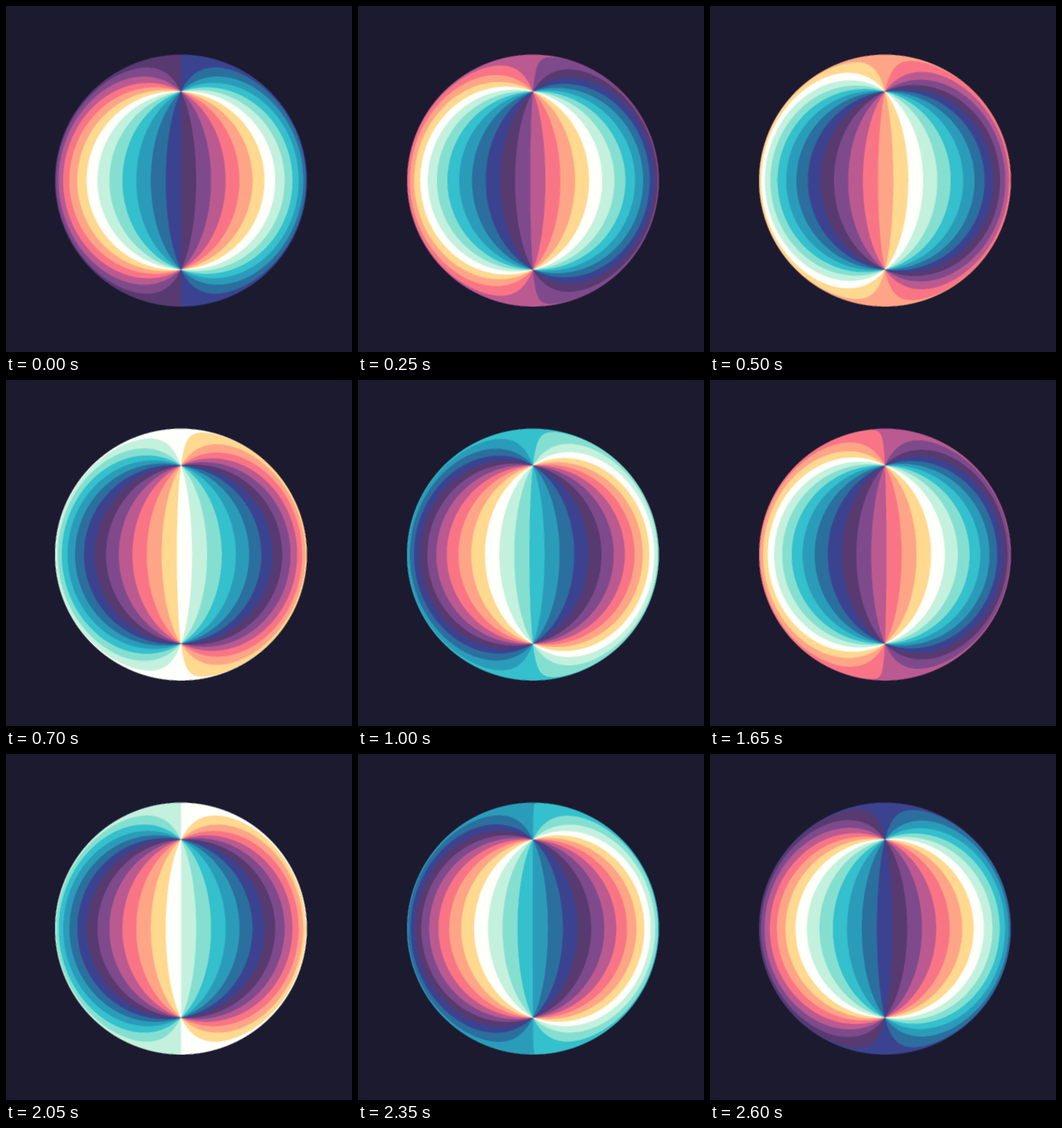
Write an HTML page with a canvas that moves like this. It is 498 px wide and 498 px high and loops after 2.65 s.

```html
<!DOCTYPE html>
<html lang="en">
<head>
<meta charset="utf-8">
<title>Banded sphere</title>
<style>
  html, body { margin: 0; width: 100%; height: 100%; overflow: hidden; background: #1c1a2f; }
  canvas { display: block; width: 498px; height: 498px; }
</style>
</head>
<body>
<canvas id="stage" width="498" height="498"></canvas>
<script>
const SIZE = 498, CX = 251.8, CY = 251.3, R = 181.3;
const LOOP = 2650, STEP = 50, TAPS = 9, SPREAD = 0.75;
const BG = [28, 26, 47];
const BANDS = [
  '573a70', '7e4a8c', 'bb5a90', 'f97585', 'ffa587', 'ffd98f', 'fffffb',
  'c3f1de', '85dfd0', '34c0cc', '2a9cba', '2a6f9e', '3b4390'
].map(hex => [0, 2, 4].map(i => parseInt(hex.substr(i, 2), 16)));
const N = BANDS.length;

// Rotation in bands after a number of steps; the speed drifts slightly.
const TURN = [[0, 0], [5, 2.18], [14, 6.27], [26, 12.2], [33, 15.9], [41, 20], [52, 25.53], [53, 26]];

const ctx = document.getElementById('stage').getContext('2d');
const left = Math.floor(CX - R) - 2, top0 = Math.floor(CY - R) - 2;
const side = Math.ceil(2 * R) + 5;
const image = ctx.createImageData(side, side);
const pixels = image.data;
const lon = new Float32Array(side * side * TAPS);

// Longitude, in bands, of a whole sphere in equal-area azimuthal projection.
function longitude(px, py) {
  const x = (px - CX) / R, y = (py - CY) / R, rr = x * x + y * y;
  if (rr >= 1) return -1;
  const angle = Math.atan2(2 * x * Math.sqrt(1 - rr), 1 - 2 * rr);
  return Math.min((angle / Math.PI + 1) * N, 2 * N - 1e-4);
}

function prepare() {
  let i = 0;
  for (let y = 0; y < side; y++)
    for (let x = 0; x < side; x++)
      for (let t = 0; t < TAPS; t++) {
        const dx = (t % 3 - 1) * SPREAD, dy = (Math.floor(t / 3) - 1) * SPREAD;
        lon[i++] = longitude(left + x + 0.5 + dx, top0 + y + 0.5 + dy);
      }
}

function turnAt(step) {
  let i = 1;
  while (TURN[i][0] < step) i++;
  const [a, from] = TURN[i - 1], [b, to] = TURN[i];
  return from + (to - from) * (step - a) / (b - a);
}

function draw(step) {
  const shift = turnAt(step) % N;
  for (let p = 0, i = 0; p < pixels.length; p += 4) {
    let r = 0, g = 0, b = 0;
    for (let t = 0; t < TAPS; t++) {
      const k = lon[i++];
      const c = k < 0 ? BG : BANDS[((k + shift) | 0) % N];
      r += c[0]; g += c[1]; b += c[2];
    }
    pixels[p] = r / TAPS;
    pixels[p + 1] = g / TAPS;
    pixels[p + 2] = b / TAPS;
    pixels[p + 3] = 255;
  }
  ctx.putImageData(image, left, top0);
}

prepare();
ctx.fillStyle = `rgb(${BG})`;
ctx.fillRect(0, 0, SIZE, SIZE);

const start = performance.now();
let shown = -1;
function tick() {
  const step = Math.floor((performance.now() - start) % LOOP / STEP);
  if (step !== shown) draw(shown = step);
  requestAnimationFrame(tick);
}
tick();
</script>
</body>
</html>
```
